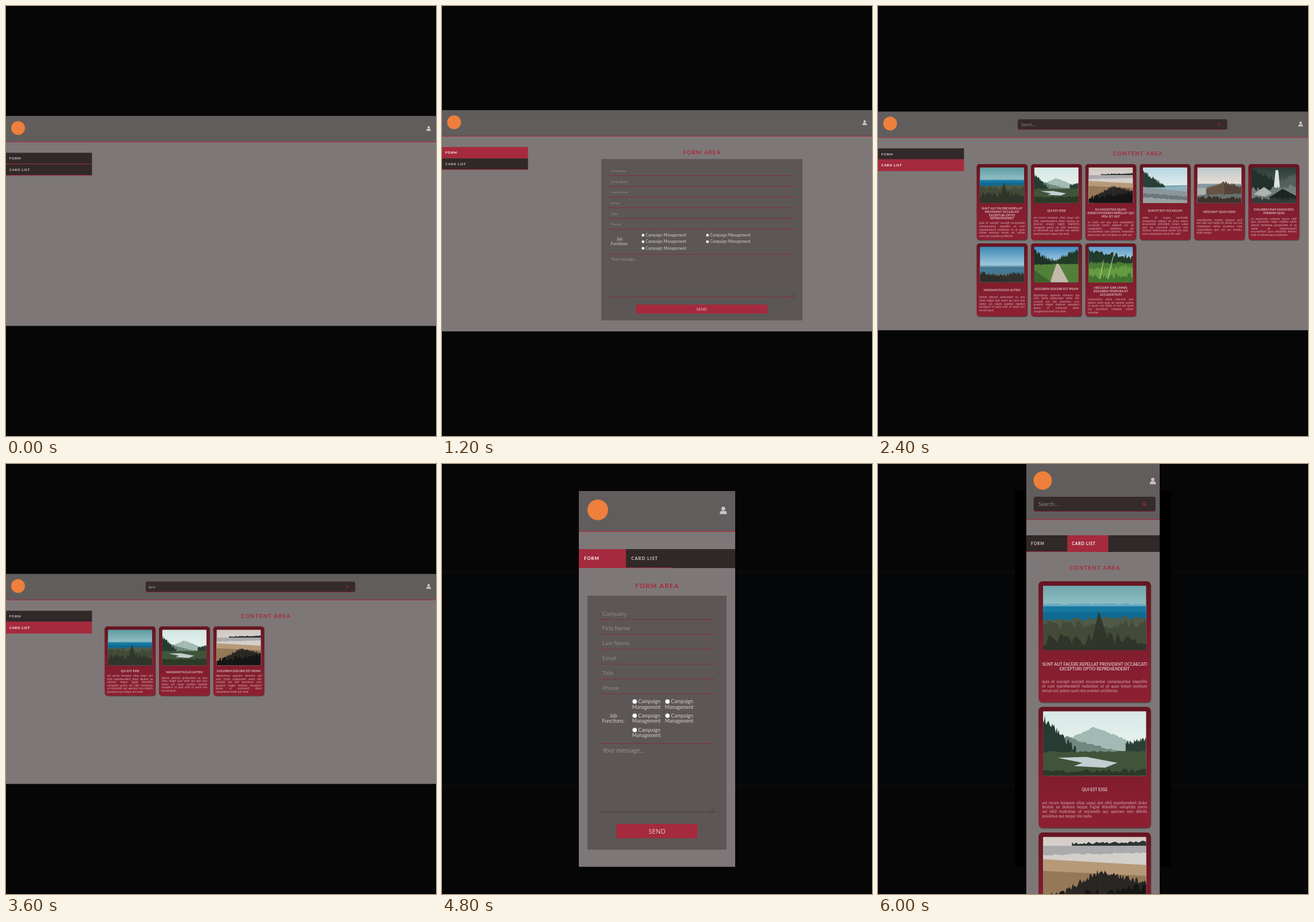
Recreate the animation shown at these times as an HTML page with a canvas. Size 748 px wide and 748 px high, loop 7.2 s.

```html
<!DOCTYPE html>
<html lang="en">
<head>
<meta charset="utf-8">
<title>Responsive form and card list</title>
<style>
html, body { margin: 0; width: 100%; height: 100%; overflow: hidden; background: #060606; }
canvas { display: block; width: 100vw; height: 100vh; }
</style>
</head>
<body>
<canvas id="stage" width="748" height="748"></canvas>
<script>
const ctx = document.getElementById('stage').getContext('2d');
const SCENE_MS = 1200;
const LATO = 'Lato, sans-serif', OPEN = '"Open Sans", sans-serif';
const RED = '#a52a3d', DARK = '#312828', PAGE = '#7e7777', HEADER = '#615d5c', PANEL = '#5c5756';
const PALE = '#d3cccc', HINT = '#979190', RULE = '#872c3a';

function rect(x, y, w, h, color) {
  ctx.fillStyle = color;
  ctx.fillRect(x, y, w, h);
}

function round(x, y, w, h, r, color) {
  ctx.fillStyle = color;
  ctx.beginPath();
  ctx.roundRect(x, y, w, h, r);
  ctx.fill();
}

function disc(x, y, r, color) {
  ctx.fillStyle = color;
  ctx.beginPath();
  ctx.arc(x, y, r, 0, Math.PI * 2);
  ctx.fill();
}

function setFont(size, { weight = 400, family = LATO, spacing = 0, align = 'left' } = {}) {
  ctx.font = `${weight} ${size}px ${family}`;
  ctx.letterSpacing = spacing + 'px';
  ctx.textAlign = align;
}

function text(str, x, y, size, color, style) {
  setFont(size, style);
  ctx.fillStyle = color;
  ctx.fillText(str, x, y);
}

function justify(lines, x, y, width, pitch, size, color) {
  setFont(size);
  ctx.fillStyle = color;
  lines.forEach((line, i) => {
    const base = y + i * pitch;
    if (i === lines.length - 1) return ctx.fillText(line, x, base);
    const words = line.split(' ');
    const widths = words.map(word => ctx.measureText(word).width);
    const gap = (width - widths.reduce((a, b) => a + b)) / (words.length - 1);
    let left = x;
    words.forEach((word, j) => {
      ctx.fillText(word, left, base);
      left += widths[j] + gap;
    });
  });
}

// Photos are painted in a unit square.
let seed = 1;
function random() {
  seed = (seed * 16807) % 2147483647;
  return seed / 2147483647;
}

function sky(...colors) {
  const g = ctx.createLinearGradient(0, 0, 0, 1);
  colors.forEach((c, i) => g.addColorStop(i / (colors.length - 1), c));
  rect(0, 0, 1, 1, g);
}

function band(color, left, right, rough = 0, x0 = 0, x1 = 1, bottom = 1) {
  const steps = 36;
  ctx.fillStyle = color;
  ctx.beginPath();
  ctx.moveTo(x0, bottom);
  for (let i = 0; i <= steps; i++) {
    const t = i / steps;
    ctx.lineTo(x0 + (x1 - x0) * t, left + (right - left) * t + (random() - .5) * rough);
  }
  ctx.lineTo(x1, bottom);
  ctx.fill();
}

function shape(color, ...points) {
  ctx.fillStyle = color;
  ctx.beginPath();
  points.forEach(([x, y]) => ctx.lineTo(x, y));
  ctx.fill();
}

const photos = [
  () => {
    sky('#5f9aa2', '#8fbfc3', '#b5d3d4', '#b5d3d4');
    band('#6aa9c0', .33, .33, .02);
    band('#17789f', .36, .36);
    band('#0f6a94', .43, .43);
    band('#4e5a46', .52, .49, .05);
    band('#434a38', .59, .56, .12);
    shape('#2f382b', [.47, .8], [.54, .42], [.64, .8]);
    band('#30342a', .76, .74, .16);
  },
  () => {
    sky('#d3e6e2', '#e6f2ef', '#cfdedb');
    band('#a3b9b3', .58, .3, .02, 0, .5);
    band('#a3b9b3', .3, .55, .02, .5, 1);
    band('#70887f', .38, .6, .03, .1, .75);
    band('#263b32', .19, .57, .1, 0, .32);
    band('#2b4035', .5, .44, .06, .8, 1);
    band('#40543a', .6, .59, .02);
    shape('#c3ced0', [.14, .67], [.42, .66], [.72, .73], [.6, .79], [.3, .77], [.38, .73]);
    band('#2b3a26', .83, .82, .05);
  },
  () => {
    sky('#cfc6c0', '#e3ded8', '#c9c6c5');
    band('#2b3434', .19, .17, .03, .28, 1, .22);
    band('#aaa9ac', .22, .22);
    band('#d3cfcb', .33, .3, .02);
    band('#b69a78', .38, .45);
    band('#957858', .52, .58);
    band('#292624', .82, .53, .08, .12, .55);
    band('#292624', .53, .66, .08, .55, 1);
    band('#151515', .84, .72, .12);
  },
  () => {
    sky('#b7d6e2', '#deebed', '#dce8e9');
    band('#6f9fae', .52, .5);
    band('#8eb2bb', .57, .52);
    band('#294039', .1, .52, .12, 0, .5, .56);
    band('#8b969b', .55, .68, .02);
    band('#6d777b', .72, .82, .04);
    band('#9ba1a2', .84, .92, .04);
  },
  () => {
    sky('#bcc6ca', '#ebe0d8', '#e4d3c7');
    band('#879aa0', .46, .46);
    band('#a9b0ae', .58, .56, .02);
    band('#675344', .58, .42, .08, .2, .6);
    band('#544439', .42, .55, .08, .6, 1);
    band('#66736d', .78, .73, .04);
    band('#3c332c', .84, .86, .1);
  },
  () => {
    sky('#2d3c36', '#4c5753', '#333c3a');
    band('#223129', .06, .35, .16, 0, .5);
    band('#53605c', .42, .18, .12, .6, 1);
    shape('#dce4e3', [.54, .08], [.6, .08], [.64, .58], [.5, .58]);
    band('#737d7a', .62, .52, .14);
    shape('#acb3b1', [.04, .76], [.28, .55], [.46, .72], [.3, .82]);
    shape('#1c2523', [.38, .85], [.7, .6], [1, .8], [1, 1]);
    band('#333b39', .85, .88, .12);
  },
  () => {
    sky('#3c86b6', '#9bc7db', '#d5e3e5');
    band('#7fa5b8', .52, .52, .01);
    band('#447994', .56, .56);
    band('#7b7567', .76, .8, .06);
    band('#2c2d2b', .72, .84, .12, 0, .6);
    band('#33302b', .82, .73, .12, .45, 1);
  },
  () => {
    sky('#3f8bc4', '#b9d7e5', '#b9d7e5');
    band('#1c3225', .12, .4, .16, 0, .42);
    band('#233a28', .4, .1, .14, .42, 1);
    band('#52803a', .5, .48, .03);
    shape('#c2b9ab', [.5, .48], [.55, .48], [.78, 1], [.36, 1]);
    band('#39652c', .66, 1, .06, 0, .4);
  },
  () => {
    sky('#5a9dcc', '#c4dce4', '#c4dce4');
    band('#223c2b', .12, .3, .14);
    band('#4a7b35', .44, .46, .06);
    band('#649b42', .62, .56, .14);
    band('#41752f', .84, .8, .16);
    shape('#a9bd73', [.42, .9], [.58, .12], [.59, .12], [.45, .9]);
    shape('#a9bd73', [.24, .9], [.34, .36], [.35, .36], [.27, .9]);
  }
];

function photo(index, x, y, w, h) {
  const fullHeight = w / 1.24;
  ctx.save();
  ctx.beginPath();
  ctx.roundRect(x, y, w, h, 1);
  ctx.clip();
  ctx.translate(x, y + (h - fullHeight) / 2);
  ctx.scale(w, fullHeight);
  seed = 97 + index * 31;
  photos[index]();
  ctx.restore();
}

const posts = [
  ['SUNT AUT FACERE REPELLAT|PROVIDENT OCCAECATI|EXCEPTURI OPTIO|REPREHENDERIT',
   'quia et suscipit suscipit recusandae|consequuntur expedita et cum|reprehenderit molestiae ut ut quas|totam nostrum rerum est autem|sunt rem eveniet architecto'],
  ['QUI EST ESSE',
   'est rerum tempore vitae sequi sint|nihil reprehenderit dolor beatae ea|dolores neque fugiat blanditiis|voluptate porro vel nihil molestiae|ut reiciendis qui aperiam non debitis|possimus qui neque nisi nulla'],
  ['EA MOLESTIAS QUASI|EXERCITATIONEM REPELLAT QUI|IPSA SIT AUT',
   'et iusto sed quo iure voluptatem|occaecati omnis eligendi aut ad|voluptatem doloribus vel|accusantium quis pariatur molestiae|porro eius odio et labore et velit aut'],
  ['EUM ET EST OCCAECATI',
   'ullam et saepe reiciendis|voluptatem adipisci sit amet autem|assumenda provident rerum culpa|quis hic commodi nesciunt rem|tenetur doloremque ipsam iure quis|sunt voluptatem rerum illo velit'],
  ['NESCIUNT QUAS ODIO',
   'repudiandae veniam quaerat sunt|sed alias aut fugiat sit autem sed est|voluptatem omnis possimus esse|voluptatibus quis est aut tenetur|dolor neque'],
  ['DOLOREM EUM MAGNI EOS|APERIAM QUIA',
   'ut asperiores corporis harum nihil|quis provident sequi mollitia nobis|aliquid molestiae perspiciatis et ea|nemo ab reprehenderit|accusantium quas voluptate dolores|velit et doloremque molestiae'],
  ['MAGNAM FACILIS AUTEM',
   'dolore placeat quibusdam ea quo|vitae magni quis enim qui quis quo|nemo aut saepe quidem repellat|excepturi ut quia sunt ut sequi eos|ea sed quas.'],
  ['DOLOREM DOLORE EST IPSAM',
   'dignissimos aperiam dolorem qui|eum facilis quibusdam animi sint|suscipit qui sint possimus cum|quaerat magni maiores excepturi|ipsam ut commodi dolor|voluptatum modi aut vitae'],
  ['NESCIUNT IURE OMNIS|DOLOREM TEMPORA ET|ACCUSANTIUM',
   'consectetur animi nesciunt iure|dolore enim quia ad veniam autem|ut quam aut nobis et est aut quod|aut provident voluptas autem|voluptas']
];
const widePosts = [
  ['SUNT AUT FACERE REPELLAT PROVIDENT OCCAECATI|EXCEPTURI OPTIO REPREHENDERIT',
   'quia et suscipit suscipit recusandae consequuntur expedita|et cum reprehenderit molestiae ut ut quas totam nostrum|rerum est autem sunt rem eveniet architecto'],
  ['QUI EST ESSE',
   'est rerum tempore vitae sequi sint nihil reprehenderit dolor|beatae ea dolores neque fugiat blanditiis voluptate porro|vel nihil molestiae ut reiciendis qui aperiam non debitis|possimus qui neque nisi nulla'],
  posts[2]
];

// Title and body share the space below the photo with equal gaps.
function card(x, y, w, h, photoIndex, post, photoHeight, k) {
  const [title, body] = post.map(part => part.split('|'));
  const pad = 5.7 * k, pitch = 5.6 * k, titlePitch = 5.75 * k;
  round(x + .6 * k, y + 1.2 * k, w, h, 5 * k, '#514a4a');
  const g = ctx.createLinearGradient(0, y, 0, y + h);
  g.addColorStop(0, '#651521');
  g.addColorStop(.5, '#7f1d2c');
  g.addColorStop(1, '#8d2032');
  round(x, y, w, h, 5 * k, g);
  photo(photoIndex, x + pad, y + pad, w - 2 * pad, photoHeight);

  const top = pad + photoHeight + 4.5 * k;
  const gap = (h - top - 1.3 - title.length * titlePitch - body.length * pitch) / 3;
  const titleBase = y + top + gap + 4.4 * k;
  title.forEach((line, i) => text(line, x + w / 2, titleBase + i * titlePitch, 5.2 * k, '#dcbfc3',
    { weight: 700, align: 'center' }));
  justify(body, x + 4.5 * k, titleBase + (title.length - 1) * titlePitch + pitch + gap,
    w - 9 * k, pitch, 4.9 * k, '#d0abb0');
}

function userIcon(x, y, s) {
  disc(x, y - .25 * s, .26 * s, '#c9c4c3');
  round(x - .46 * s, y + .06 * s, .92 * s, .44 * s, [.28 * s, .28 * s, .08 * s, .08 * s], '#c9c4c3');
}

function searchBox(x, y, w, h, value, size, color, iconX, iconSize) {
  round(x, y, w, h, 3.4, RED);
  round(x, y, w, h - .8, 3.4, '#352b2b');
  text(value, x + size * .97, y + h / 2 + size * .36, size, color, { family: OPEN });
  const cy = y + h / 2, r = iconSize * .32;
  ctx.strokeStyle = RED;
  ctx.lineWidth = iconSize * .17;
  ctx.beginPath();
  ctx.arc(iconX - r * .4, cy - r * .4, r, 0, Math.PI * 2);
  ctx.moveTo(iconX + r * .35, cy + r * .35);
  ctx.lineTo(iconX + r * 1.4, cy + r * 1.4);
  ctx.stroke();
}

function heading(str, x, y, size, spacing) {
  text(str, x + spacing / 2, y, size, RED, { weight: 700, spacing, align: 'center' });
}

function navItem(label, active, x, y, w, h, indent, size, spacing) {
  rect(x, y, w, h, active ? RED : DARK);
  if (!active) rect(x, y + h - 1, w, 1, RED);
  text(label, x + indent, y + h / 2 + size * .33, size, active ? '#fff' : PALE, { weight: 700, spacing });
}

function desktop(top, bottom, active) {
  rect(0, top, 748, bottom - top, PAGE);
  rect(0, top, 748, 44.6, HEADER);
  rect(0, top + 44.4, 748, 1.1, RED);
  disc(21, top + 20.7, 12, '#ee7f3c');
  userIcon(735.2, top + 21.6, 8.4);
  ['FORM', 'CARD LIST'].forEach((label, i) =>
    navItem(label, active === i, 0, top + 63.8 + i * 19.8, 149.6, 19.8, 5.8, 6.1, .65));
}

function mobile(x, y, w, h, headerHeight, navY, navHeight, tab, active, size, spacing) {
  rect(x, y, w, h, PAGE);
  rect(x, y, w, headerHeight, HEADER);
  rect(x, y + headerHeight, w, 1.3, RED);
  rect(x, navY, w, navHeight, DARK);
  ['FORM', 'CARD LIST'].forEach((label, i) =>
    navItem(label, active === i, x + i * tab, navY, tab, navHeight, size * 1.17, size, spacing));
}

function form({ box, left, right, labelX, base, step, rule, size, area, button }) {
  rect(...box, PANEL);
  const line = (y, color = RULE) => rect(left, y - .5, right - left, 1, color);
  ['Company', 'First Name', 'Last Name', 'Email', 'Title', 'Phone'].forEach((label, i) => {
    text(label, labelX, base + i * step, size, HINT, { family: OPEN });
    line(base + rule + i * step);
  });
  line(area.top);
  text('Your message...', labelX, area.base, size * 1.145, HINT);
  line(area.bottom, area.color);
  ctx.strokeStyle = '#3b3636';
  ctx.lineWidth = .7;
  ctx.beginPath();
  for (const d of [.35, .75]) {
    ctx.moveTo(right - 2 - d * size, area.bottom - 1.5);
    ctx.lineTo(right - 2, area.bottom - 1.5 - d * size);
  }
  ctx.stroke();
  rect(...button, RED);
  const [x, y, w, h] = button;
  text('SEND', x + w / 2, y + h / 2 + size * .44, size * 1.21, '#e3cbce', { family: OPEN, align: 'center' });
}

function radios(columns, rows, r, drawLabel) {
  rows.forEach((y, row) => columns.forEach((x, column) => {
    if (row === 2 && column === 1) return;
    disc(x, y, r, '#8b8585');
    disc(x, y, r * .85, '#fff');
    drawLabel(x, y);
  }));
}

function jobLabel(x, y, pitch, size) {
  text('Job', x, y, size, PALE, { align: 'center' });
  text('Functions:', x, y + pitch, size, PALE, { align: 'center' });
}

const column = i => 171.5 + i * 94.55;

function residue() {
  rect(0, 184, 748, 380, '#090909');
  rect(0, 192, 748, 365, '#050607');
}

const scenes = [
  () => desktop(191.5, 556.5),

  () => {
    desktop(181.5, 566, 0);
    heading('FORM AREA', 451.8, 258, 9.8, 1);
    form({
      box: [277, 266.3, 350, 280.7], left: 289, right: 614.5, labelX: 294, base: 289.2, step: 18.6, rule: 6,
      size: 5.95, area: { top: 432, base: 443, bottom: 506.3, color: RULE }, button: [337.5, 519.3, 228.5, 15.7]
    });
    jobLabel(308.8, 408.2, 7.5, 6.6);
    radios([349.7, 461.8], [398.7, 410, 421.4], 2.6,
      (x, y) => text('Campaign Management', x + 4.5, y + 2.3, 6.8, PALE));
  },

  () => {
    desktop(183.8, 564, 1);
    searchBox(243, 197, 364.5, 18.6, 'Search...', 6.2, HINT, 594, 5.2);
    heading('CONTENT AREA', 451.8, 260.4, 9.8, 1);
    posts.forEach((post, i) => {
      const second = i > 5;
      card(column(i % 6), second ? 413 : 275, 88.5, second ? 127 : 132, i, post, 62, 1);
    });
  },

  () => {
    desktop(191.5, 556.5, 1);
    searchBox(243, 204.6, 364.5, 18.6, 'qui e', 5, PALE, 594, 5.2);
    heading('CONTENT AREA', 451.8, 268, 9.8, 1);
    [1, 6, 7].forEach((post, i) => card(column(i), 282.6, 88.5, 120.5, i, posts[post], 62, 1));
  },

  () => {
    residue();
    mobile(238, 47, 272, 653.7, 69.8, 148, 33, 82, 0, 7.8, .9);
    disc(271, 79.8, 18, '#ee7f3c');
    userIcon(489.3, 80.8, 13);
    heading('FORM AREA', 373.8, 216, 11.3, 1.2);
    form({
      box: [253, 229, 242, 442], left: 273, right: 475.5, labelX: 279, base: 263.6, step: 25.8, rule: 7,
      size: 9.5, area: { top: 486.2, base: 501.7, bottom: 605.5, color: '#433d3d' }, button: [303.5, 626, 141, 25]
    });
    jobLabel(298, 440.8, 9.5, 8.6);
    radios([335.2, 392.2], [413.2, 437.8, 462.7], 4.3, (x, y) => {
      text('Campaign', x + 6, y + 3.2, 8.9, PALE);
      text('Management', x + 20.4, y + 12.6, 8.6, PALE, { align: 'center' });
    });
  },

  () => {
    residue();
    rect(238, 47, 272, 653.7, '#000');
    mobile(258, 0, 232, 748, 96, 124, 29, 71.3, 1, 6.9, .8);
    disc(286.5, 28.7, 16, '#ee7f3c');
    userIcon(478, 29.7, 11.2);
    searchBox(270.8, 57, 212, 26, 'Search...', 8.7, HINT, 463.7, 7.4);
    heading('CONTENT AREA', 376.8, 184.2, 9.9, 1.1);
    widePosts.forEach((post, i) => card(279.2, 204 + i * 218.5, 195.3, 210.3, i, post, 112, 1.38));
  }
];

let shown = -1;
function tick() {
  const current = Math.floor(performance.now() / SCENE_MS) % scenes.length;
  if (current !== shown) {
    shown = current;
    rect(0, 0, 748, 748, '#060606');
    scenes[current]();
  }
  requestAnimationFrame(tick);
}
tick();
</script>
</body>
</html>
```
